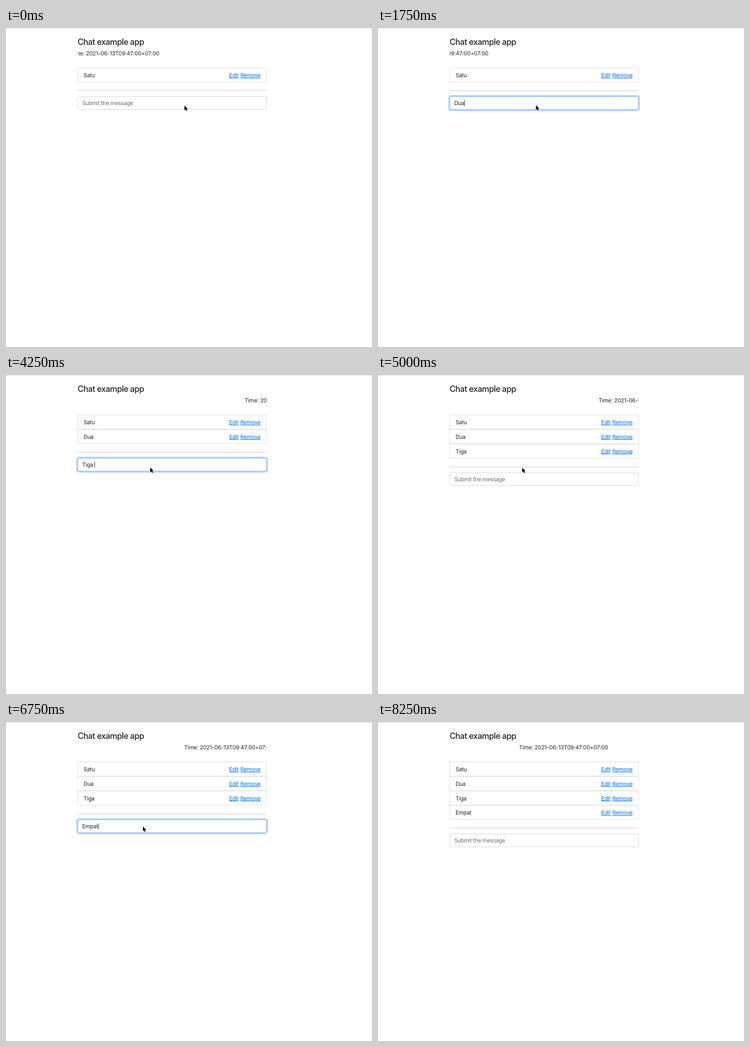
These frames come from a looping animation (802 px wide and 699 px high, 8.5 s). An HTML page:

```html
<!DOCTYPE html>
<html lang="en">
<head>
<meta charset="utf-8">
<title>Chat example app</title>
<style>
  html, body { margin: 0; width: 100%; height: 100%; overflow: hidden; background: #fff; }
  svg { display: block; width: 802px; height: 699px; }
  text {
    font: 400 12px Inter, "Liberation Sans", sans-serif;
    font-optical-sizing: none;
    letter-spacing: -.22px;
    fill: #202326;
    white-space: pre;
  }
  #title { font-size: 18px; font-weight: 500; letter-spacing: -.6px; }
  #clock { letter-spacing: -.14px; }
  .link { fill: #006ef5; text-decoration: underline; }
  .row rect { fill: none; stroke: #dadada; }
  #hint { fill: #646b72; }
</style>
</head>
<body>
<svg viewBox="0 0 802 699">
  <defs>
    <clipPath id="lane"><rect x="157" y="45" width="414.5" height="22"/></clipPath>
  </defs>
  <rect width="802" height="1" fill="#dcdcdc"/>
  <text id="title" x="157" y="36.5">Chat example app</text>
  <g clip-path="url(#lane)"><text id="clock" y="60">Time: 2021-06-13T09:47:00+07:00</text></g>
  <g id="list"></g>
  <g id="form">
    <rect x="157" y="137" width="414" height="1" fill="#c8c9ca"/>
    <rect id="ring" x="155.5" y="148.5" width="417" height="32" rx="4.5" fill="none" stroke="#b6d4fe" stroke-width="3"/>
    <rect id="field" x="157.5" y="150.5" width="413" height="28" rx="2.5" fill="#fff"/>
    <text id="hint" x="167" y="169">Submit the message</text>
    <text id="typed" x="167" y="169"></text>
    <rect id="caret" y="158" width="1" height="13" fill="#222"/>
  </g>
  <path id="pointer" d="M0 0V10.4L2.4 8.2L4 11.9L5.9 11.1L4.3 7.4H7.5Z"
        fill="#000" stroke="#fff" stroke-width="1" paint-order="stroke"/>
</svg>
<script>
const LOOP = 8500, STEP = 250, PITCH = 31.75;
const $ = id => document.getElementById(id);

// time, rows, focus strength, typed text
const states = [
  [0, 1, 0, ""], [750, 1, 1, ""],
  [1250, 1, 1, "D"], [1500, 1, 1, "Du"], [1750, 1, 1, "Dua"],
  [2250, 2, 0, ""], [3250, 2, 1, ""],
  [3500, 2, 1, "T"], [3750, 2, 1, "Tig"], [4000, 2, 1, "Tiga"], [4250, 2, 1, "Tiga "],
  [4500, 3, 0, ""], [6000, 3, .35, ""],
  [6250, 3, 1, "E"], [6500, 3, 1, "Emp"], [6750, 3, 1, "Empat"],
  [7000, 4, 0, ""]
];

// time, x, y of the pointer tip
const pointerPath = [
  [0, 391, 170], [250, 380, 170], [500, 352, 169], [750, 346, 169],
  [2250, 346, 169], [2500, 328, 190], [2750, 316, 202.5],
  [5000, 316, 203], [5250, 310, 222], [5500, 301, 241], [5750, 300, 232], [6000, 300, 229]
];
const POINTER_END = 7500;

// time, edge of the marquee text: right while leaving, left while entering
const leaving = [[0, 336], [1000, 282.5], [2750, 188], [3250, 161]];
const entering = [[3500, 563], [4250, 523], [6000, 430.5], [7250, 364], [8250, 309]];

function at(path, t) {
  const i = path.findIndex(p => p[0] > t);
  if (i < 0) return path[path.length - 1].slice(1);
  const a = path[i - 1], b = path[i], k = (t - a[0]) / (b[0] - a[0]);
  return a.slice(1).map((v, n) => v + (b[n + 1] - v) * k);
}

const rows = ["Satu", "Dua", "Tiga", "Empat"].map((word, i) => {
  const g = document.createElementNS("http://www.w3.org/2000/svg", "g");
  g.setAttribute("class", "row");
  g.setAttribute("transform", `translate(0 ${i * PITCH})`);
  g.innerHTML = `<rect x="157.5" y="87.5" width="413" height="31"/>
    <text x="170" y="108">${word}</text>
    <text class="link" x="489" y="108">Edit</text>
    <text class="link" x="513.5" y="108">Remove</text>`;
  $("list").append(g);
  return g;
});

const show = (el, on) => el.style.display = on ? "" : "none";

function draw(t) {
  const [, count, focus, text] = states.findLast(s => s[0] <= t);
  rows.forEach((row, i) => show(row, i < count));
  $("form").setAttribute("transform", `translate(0 ${Math.round((count - 1) * PITCH)})`);

  $("ring").setAttribute("opacity", focus < 1 ? focus * .5 : 1);
  $("field").setAttribute("stroke", focus ? "#86b7fe" : "#ced2d6");
  show($("hint"), !text);
  $("typed").textContent = text;
  show($("caret"), focus > 0);
  const width = text ? $("typed").getComputedTextLength() : 0;
  $("caret").setAttribute("x", Math.round(167 + width));

  const out = t < entering[0][0];
  $("clock").setAttribute("text-anchor", out ? "end" : "start");
  $("clock").setAttribute("x", at(out ? leaving : entering, t)[0]);

  show($("pointer"), t < POINTER_END);
  $("pointer").setAttribute("transform", `translate(${at(pointerPath, t)})`);
}

const start = performance.now();
function tick() {
  const t = (performance.now() - start) % LOOP;
  draw(Math.floor(t / STEP) * STEP);
  requestAnimationFrame(tick);
}
tick();
</script>
</body>
</html>
```
